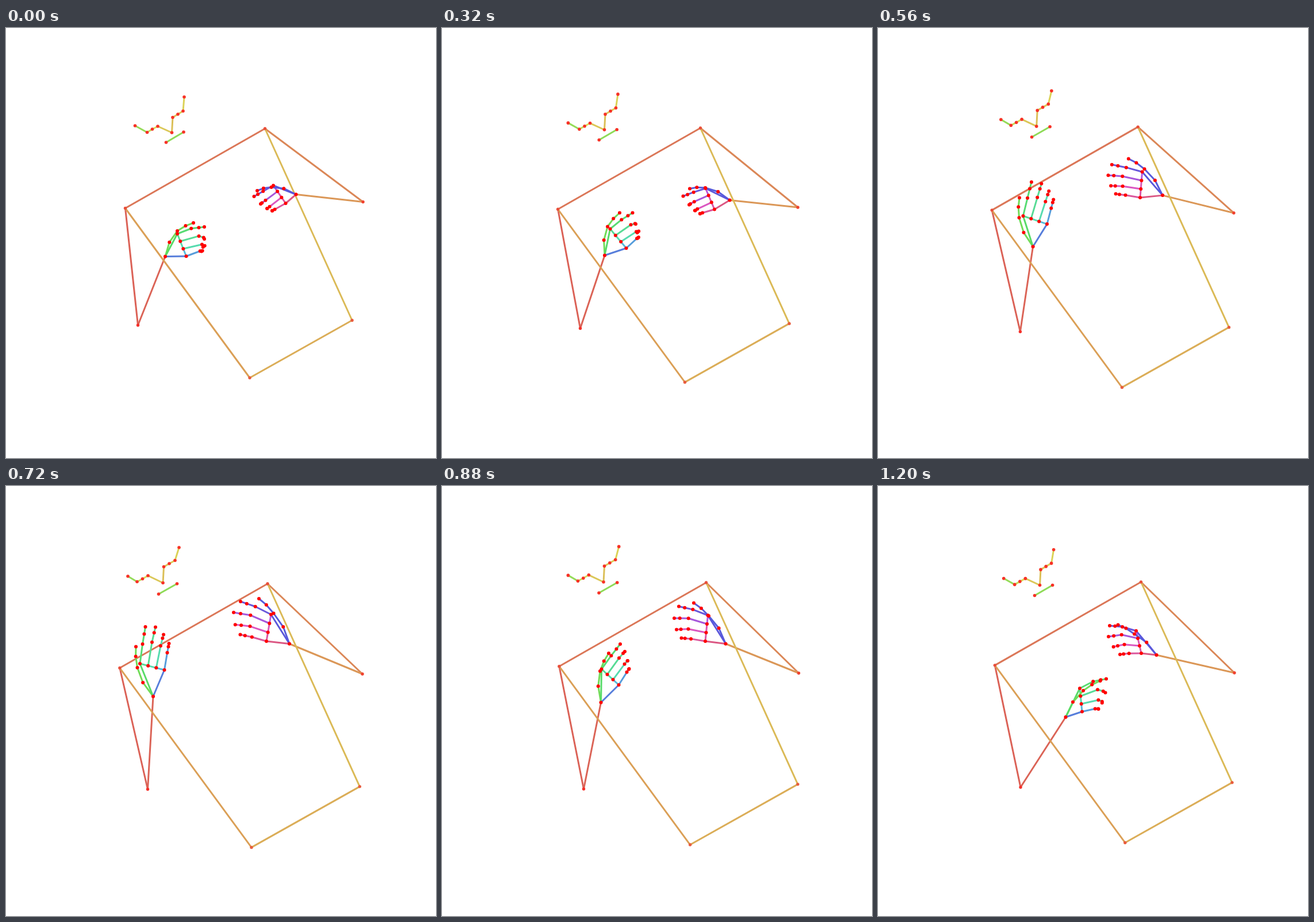
An HTML page with a canvas for the animation above (1.28 s loop, 748x748 px).

```html
<!DOCTYPE html>
<html lang="en">
<head>
<meta charset="utf-8">
<title>Skeleton motion</title>
<style>
  html, body { margin: 0; width: 100%; height: 100%; overflow: hidden; background: #fff; }
  canvas { display: block; width: 748px; height: 748px; }
</style>
</head>
<body>
<canvas id="stage" width="748" height="748"></canvas>
<script>
const STEP = 80, STEPS = 16;
const ctx = document.getElementById('stage').getContext('2d');

// torso: right shoulder x, y, size    head: nose x, y, turn    elbows: left, right
// hands: wrist, thumb knuckle and tip, index and pinky knuckles,
//        index, middle and pinky tips, then curl and bend
const poses = [];
const pose = (step, torso, head, elbows, left, right) =>
  poses.push({ step, torso, head, elbows, left, right });

pose(0, [450.5,175, 1], [288.5,182, 0], [229.5,517, 621,302.5],
  [277,397.5, 298,353, 326,339, 298,358, 313.5,397, 345,346, 345,367, 340,388.5, 0.43, 6],
  [504.5,289.5, 461.5,277, 437,283, 465,274, 486.5,305, 431.5,293, 443,306, 463,318, 0.3, 0]);
pose(4, [449.5,174, 1.02], [282.5,177, 0.3], [240.5,522.5, 619,312],
  [283,395.5, 288,345.5, 309,321.5, 292.5,349.5, 320.5,383, 331.5,321.5, 337,341, 340.5,365.5, 0.45, 3],
  [500.5,299.5, 458,278, 431,279.5, 458.5,279, 474,315.5, 419.5,292.5, 430,307.5, 449,323, 0.33, 1]);
pose(6, [451,173, 1.037], [278,172.5, 0.55], [247,528, 618.5,318.5],
  [277.5,388, 259.5,337.5, 264.5,305, 267,337, 306,355.5, 287.5,284.5, 303,291, 320,318, 0.17, 0],
  [496.5,298.5, 462,258.5, 433.5,246, 459,264, 459.5,307, 408,258.5, 406,276.5, 420.5,304.5, 0.13, 1]);
pose(9, [455,170, 1.058], [273,168.5, 1], [246.5,527.5, 620,327],
  [256,366, 228.5,316, 226,279.5, 233,309, 275.5,320, 242.5,245, 260,245.5, 283.5,274, 0.13, 1],
  [493,274.5, 465.5,221.5, 440,196, 461,223.5, 453,270, 408,201, 396,220, 407.5,258.5, 0.03, 4]);
pose(11, [459.5,168, 1.052], [281,167, 0.8], [246.5,527, 620.5,325.5],
  [276.5,376.5, 275,322, 290,291, 277.5,318.5, 307.5,346, 310,275, 318,288, 325.5,318, 0.28, 1],
  [493.5,274.5, 464,226, 438,203.5, 462.5,225, 458,270, 412,209.5, 404,230, 416.5,264.5, 0.08, 4]);
pose(13, [460,166.5, 1.044], [284.5,170, 0.4], [247.5,523, 618.5,323.5],
  [322.5,391.5, 352,344, 383,325.5, 350,338, 355.5,377, 397,319.5, 392.5,342, 381,370, 0.36, 7],
  [485.5,288, 449,248, 421.5,231, 452,243.5, 458,283.5, 407,232.5, 404,251.5, 422,283, 0.05, 5.5]);
pose(15, [457.5,167, 1.046], [281.5,172.5, 0.4], [248,524, 620,325],
  [326.5,402, 357,356, 386.5,339, 351,352, 355,392.5, 397,335.5, 395.5,359.5, 383.5,388, 0.3, 7],
  [484.5,294, 446,257.5, 417.5,241.5, 449,252, 458,291, 403,243, 401,262, 421,293, 0.05, 4.5]);

// Smooth cubic through the poses.
function sample(part, step) {
  let i = 0;
  while (i < poses.length - 2 && poses[i + 1].step <= step) i++;
  const a = poses[i], b = poses[i + 1], span = b.step - a.step;
  const before = poses[Math.max(i - 1, 0)], after = poses[Math.min(i + 2, poses.length - 1)];
  const u = (step - a.step) / span, u2 = u * u, u3 = u2 * u;
  return a[part].map((p, n) => {
    const q = b[part][n];
    const m0 = (q - before[part][n]) / (b.step - before.step) * span;
    const m1 = (after[part][n] - p) / (after.step - a.step) * span;
    return (2*u3 - 3*u2 + 1) * p + (u3 - 2*u2 + u) * m0 + (3*u2 - 2*u3) * q + (u3 - u2) * m1;
  });
}

// Point at share t of the way from a to b, pushed sideways by out.
function between([ax, ay], [bx, by], t, out = 0) {
  const dx = bx - ax, dy = by - ay, len = Math.hypot(dx, dy) || 1;
  return [ax + dx * t + dy / len * out, ay + dy * t - dx / len * out];
}

// Offsets from the right shoulder and from the nose (level and turned head).
const torsoShape = [[-243, 138.5], [0, 0], [-26.5, 433.5], [151.5, 333.5]];
const levelHead = [[-64,-12], [-43,-0.5], [-34,-6], [-24.5,-11], [0,0], [1.5,-26.5],
  [10.5,-32], [19.5,-37.5], [21.5,-62], [-10,17], [20.5,-1]];
const turnedHead = [[-61,-11.5], [-45,-2], [-35.5,-7], [-26,-12.5], [0,0], [1.5,-28],
  [11,-33.5], [21,-39], [28,-61.5], [-7.5,19.5], [24.5,1.5]];

function headJoints([x, y, turn]) {
  return levelHead.map((p, i) => {
    const [dx, dy] = between(p, turnedHead[i], turn);
    return [x + dx, y + dy];
  });
}

// How strongly each finger, index to pinky, curls and arches.
const CURL = [0, 0.6, 1, 0.92], ARCH = [0.5, 1, 0.75, 0.2];

// Wrist, four thumb joints, then four joints per finger.
function handJoints(v, side) {
  const at = i => [v[2 * i], v[2 * i + 1]];
  const [wrist, thumb, thumbTip, index, pinky, indexTip, middleTip, pinkyTip] = [0,1,2,3,4,5,6,7].map(at);
  const [curl, bend] = v.slice(16);
  const ringTip = [0, 1].map(k => 0.75 * middleTip[k] + 0.45 * pinkyTip[k] - 0.2 * indexTip[k]);
  const joints = [wrist, between(wrist, thumb, 0.52, 4 * side), thumb,
    between(thumb, thumbTip, 0.54, 1.5 * side), thumbTip];
  [indexTip, middleTip, ringTip, pinkyTip].forEach((tip, f) => {
    const knuckle = between(index, pinky, f / 3), bent = curl * CURL[f];
    const mid = between(knuckle, tip, 0.53 + bent, bend * ARCH[f] * side);
    const [x, y] = between(mid, tip, 0.58);
    const end = [x + (tip[0] - knuckle[0]) * bent / 4, y + (tip[1] - knuckle[1]) * bent / 4];
    joints.push(knuckle, mid, end, tip);
  });
  return joints;
}

// Bones: from joint, to joint, hue
const bodyBones = [[0,4,5], [4,6,6], [0,1,14], [1,5,22], [5,7,29], [0,2,33], [2,3,39], [1,3,45]];
const faceBones = [[4,5,47], [5,6,50], [6,7,53], [7,8,56], [4,3,51], [3,2,60], [2,1,70], [1,0,92], [9,10,95]];

function handBones(fingers, palm) {
  const bones = [[0,1], [0,5], [5,9], [9,13], [13,17], [0,17]].map(([a, b], i) => [a, b, palm[i]]);
  fingers.forEach((hue, f) => {
    for (let j = 1 + 4 * f; j < 4 + 4 * f; j++) bones.push([j, j + 1, hue]);
  });
  return bones;
}
const leftBones = handBones([108, 133, 148, 160, 208], [108, 128, 148, 160, 195, 222]);
const rightBones = handBones([238, 248, 276, 312, 328], [238, 242, 285, 318, 325, 340]);

const bodyDots = ['#e94f3a', '#e94f3a', '#e85c3e', '#e85c3e', '#f5302a', '#f0422f', '#f5302a', '#f0422f'];

function drawPart(joints, bones, dot, radius) {
  for (const [a, b, hue] of bones) {
    ctx.strokeStyle = `hsl(${hue}, 65%, 60%)`;
    ctx.beginPath();
    ctx.moveTo(...joints[a]);
    ctx.lineTo(...joints[b]);
    ctx.stroke();
  }
  joints.forEach(([x, y], i) => {
    ctx.fillStyle = dot(i);
    ctx.beginPath();
    ctx.arc(x, y, radius, 0, Math.PI * 2);
    ctx.fill();
  });
}

function draw(step) {
  ctx.fillStyle = '#fff';
  ctx.fillRect(0, 0, 748, 748);
  ctx.lineWidth = 3;
  ctx.lineCap = 'round';
  const [x, y, size] = sample('torso', step);
  const [lx, ly, rx, ry] = sample('elbows', step);
  const left = handJoints(sample('left', step), 1);
  const right = handJoints(sample('right', step), -1);
  const torso = torsoShape.map(([dx, dy]) => [x + dx * size, y + dy * size]);
  const body = [...torso, [lx, ly], [rx, ry], left[0], right[0]];
  drawPart(body, bodyBones, i => bodyDots[i], 2.7);
  drawPart(headJoints(sample('head', step)), faceBones, () => '#f73226', 2.8);
  drawPart(left, leftBones, () => '#f00', 3);
  drawPart(right, rightBones, () => '#f00', 3);
}

function tick() {
  draw(Math.floor(performance.now() / STEP) % STEPS);
  requestAnimationFrame(tick);
}
tick();
</script>
</body>
</html>
```
